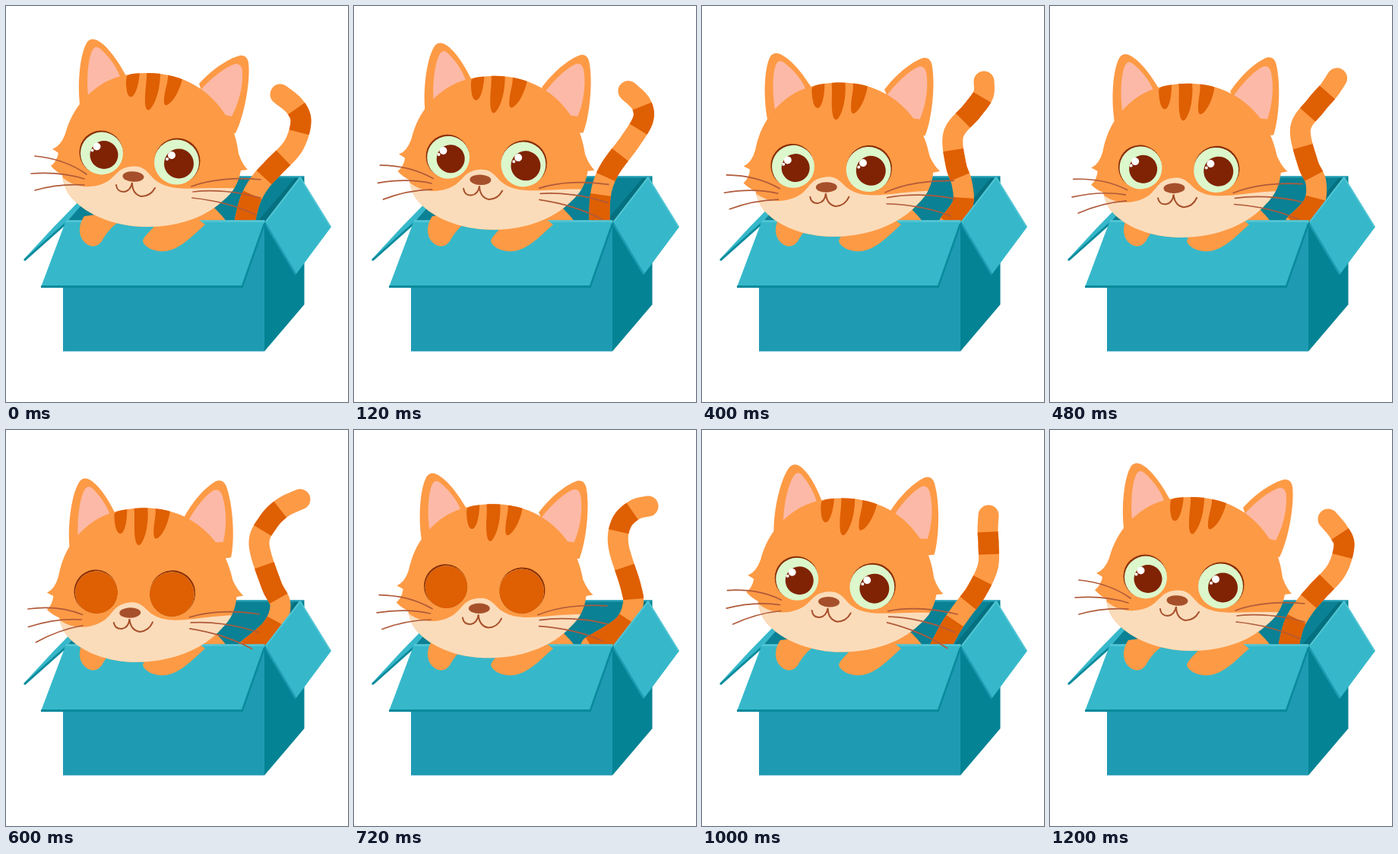
Recreate the animation shown at these times as an HTML page with a canvas. Size 450 by 520 pixels, loop 1240 ms.

```html
<!DOCTYPE html>
<html lang="en">
<head>
<meta charset="utf-8">
<title>Kitten in a box</title>
<style>
html, body { margin: 0; width: 100%; height: 100%; overflow: hidden; background: #fff; }
canvas { display: block; width: 450px; height: 520px; }
</style>
</head>
<body>
<canvas id="stage" width="450" height="520"></canvas>
<script>
const ctx = document.getElementById('stage').getContext('2d');
const LOOP = 1240, STEP = 40;
const C = {
  fur: '#fd9a45', stripe: '#df5f03', cream: '#fbdcba', pink: '#fcb9a7',
  iris: '#dcf7cb', pupil: '#7f2304', rim: '#8a2f06', nose: '#a6502b', line: '#b05a3a',
  flap: '#36b8ca', front: '#1e9bb2', side: '#048394', inside: '#0a8194',
  deep: '#05707f', edge: '#0a8a9c', light: '#55c7d6'
};

const shape = Object.fromEntries(Object.entries({
  head: 'M78 168 C86 140 100 120 124 104 C142 92 164 88 185 88 C235 88 270 112 290 145 C300 162 304 178 306 194 Q311 208 318 215 L309 216 C306 232 300 244 285 256 C262 278 225 290 187 290 C140 290 100 272 82 246 C77 238 75 230 74 222 Q65 217 59 210 Q67 204 69 193 Q65 190 61 188 Q72 184 78 168Z',
  muzzle: 'M68 218 C82 238 112 243 134 230 C146 222 148 211 168 210.5 C184 210 188 222 197 229 C220 247 255 236 312 240 L312 300 L68 300Z',
  stripes: 'M159 92 Q167 87 176 86 C175 102 171 116 166 119 Q161 121 159 112 Q157 100 159 92Z M185 86 L203 88 C203 110 196 130 189 136 Q184 139 183 128 C182 112 186 98 185 86Z M213 88 Q224 91 232 96 C228 112 220 126 212 130 Q207 132 208 122 C209 108 214 100 213 88Z',
  earL: 'M98 136 C93 105 97 62 107 47 Q112 41 120 45 C135 53 149 75 158 92 L150 130 L110 150Z',
  pinkL: 'M109 125 C105 98 108 65 115 56 Q119 51 126 58 C138 69 147 82 152 98 L130 125Z',
  earR: 'M254 102 C270 84 292 69 308 65 Q317 64 319 74 C322 100 313 145 302 167 L275 165Z',
  pinkR: 'M257 109 C270 95 288 80 302 76 Q310 75 311 86 C312 108 305 130 297 145 L275 140Z',
  mouth: 'M145 235 Q146 244 155 244 Q164 243 166 232 Q166 247 178 250 Q190 250 196 239',
  hairL: 'M106 221 Q78 201 38 197 M103 227 Q72 217 33 220 M103 235 Q70 233 38 242',
  hairR: 'M244 237 C270 227 305 225 335 228 M246 244 C270 241 305 243 335 252 M245 252 C275 255 303 262 328 274',
  pawL: 'M103 276 C96 286 95 298 100 306 C107 317 119 319 126 309 C131 300 138 290 148 284 L148 270Z',
  pawR: 'M196 288 C190 296 181 302 180 309 C183 318 197 323 209 322 C228 320 242 305 262 287 L240 270Z',
  body: 'M150 284 L150 250 L255 250 Q278 266 291 284Z'
}).map(([name, d]) => [name, new Path2D(d)]));

// Tail spine from tip to base at each time.
const tailKeys = [
  [0, 361,116, 380,132, 388,152, 378,184, 352,212, 334,232, 321,256, 313,288],
  [240, 363,107, 375,125, 371,146, 347,173, 329,208, 326,232, 328,256, 331,288],
  [400, 371,99, 370,117, 355,138, 331,168, 334,208, 342,233, 343,260, 325,286],
  [600, 387,91, 364,102, 345,121, 333,150, 349,203, 361,230, 350,260, 318,288],
  [720, 387,100, 369,105, 352,122, 348,152, 364,205, 367,230, 354,257, 312,284],
  [1000, 377,112, 376,131, 377,151, 376,180, 361,212, 344,235, 328,258, 312,288],
  [1200, 366,117, 380,134, 387,152, 377,184, 352,212, 335,232, 321,256, 313,288]
];
const bands = [[1.15, 2.45], [3.52, 4.65], [5.7, 7]];

// Ear and whisker twitch in degrees.
const twitchKeys = [[0, 0], [200, 6], [400, 0.5], [600, 8.3], [720, 1.5], [800, 0], [1000, 8.8], [1200, 0]];
const lidKeys = [[0, 0], [480, 0], [560, 1], [760, 1], [840, 0], [1240, 0]];

// Periodic smooth interpolation through a table of keys.
function smooth(keys, t) {
  const n = keys.length;
  const at = i => {
    const turn = Math.floor(i / n), k = keys[i - turn * n];
    return { t: k[0] + turn * LOOP, v: k.slice(1) };
  };
  let i = n - 1;
  while (keys[i][0] > t) i--;
  const [a, b, c, d] = [at(i - 1), at(i), at(i + 1), at(i + 2)];
  const h = c.t - b.t, s = (t - b.t) / h;
  return b.v.map((v, j) => {
    const m0 = (c.v[j] - a.v[j]) / (c.t - a.t) * h;
    const m1 = (d.v[j] - v) / (d.t - b.t) * h;
    const e = c.v[j] - v;
    return v + s * (m0 + s * (3 * e - 2 * m0 - m1 + s * (m0 + m1 - 2 * e)));
  });
}

function ramp(keys, t, ease = x => x) {
  let i = keys.length - 1;
  while (keys[i][0] > t) i--;
  const a = keys[i], b = keys[i + 1] || [LOOP, keys[0][1]];
  return a[1] + (b[1] - a[1]) * ease((t - a[0]) / (b[0] - a[0]));
}
const wave = x => (1 - Math.cos(Math.PI * x)) / 2;

function fill(path, color) {
  ctx.fillStyle = color;
  ctx.fill(path);
}
function stroke(path, color, width) {
  ctx.strokeStyle = color;
  ctx.lineWidth = width;
  ctx.stroke(path);
}
function poly(color, ...pts) {
  ctx.beginPath();
  for (let i = 0; i < pts.length; i += 2) ctx.lineTo(pts[i], pts[i + 1]);
  ctx.closePath();
  ctx.fillStyle = color;
  ctx.fill();
}
function oval(color, x, y, rx, ry = rx, turn = 0) {
  ctx.beginPath();
  ctx.ellipse(x, y, rx, ry, turn, 0, 7);
  ctx.fillStyle = color;
  ctx.fill();
}
function line(color, width, x1, y1, x2, y2) {
  ctx.beginPath();
  ctx.moveTo(x1, y1);
  ctx.lineTo(x2, y2);
  ctx.strokeStyle = color;
  ctx.lineWidth = width;
  ctx.stroke();
}
function turned(x, y, deg, draw) {
  ctx.save();
  ctx.translate(x, y);
  ctx.rotate(deg * Math.PI / 180);
  ctx.translate(-x, -y);
  draw();
  ctx.restore();
}

function boxBack() {
  poly(C.flap, 23, 333, 62, 291, 112, 240, 112, 250, 80, 282, 76, 289);
  line(C.edge, 3, 24, 334, 78, 286);
  poly(C.inside, 80, 283, 132, 224, 392, 224, 341, 283);
  poly(C.deep, 380, 226, 389, 224, 341, 283, 331, 283);
  line(C.flap, 2, 78, 284, 130, 225);
  line(C.front, 2.5, 130, 224.5, 392, 224.5);
}

function boxFront() {
  poly(C.front, 75, 300, 340, 283, 340, 453.5, 75, 453.5);
  poly(C.side, 340, 284, 392.5, 223, 392.5, 392, 340, 453.5);
  poly(C.flap, 341, 284, 387, 224, 428, 290, 381, 353);
  line(C.front, 2.5, 342, 287, 381, 352);
  line(C.light, 2, 342, 283, 387, 225);
  line(C.light, 1.5, 387, 225, 427, 290);
  poly(C.flap, 79, 281.5, 341, 281.5, 311, 369, 46, 369);
  line(C.light, 2.5, 79, 282.5, 340, 282.5);
  line(C.edge, 3, 46, 368.5, 312, 368.5);
  line(C.edge, 2.5, 311, 368, 340, 286);
}

function tail(t) {
  const p = smooth(tailKeys, t), last = p.length / 2 - 1;
  const point = u => {
    const i = Math.min(Math.floor(u), last - 1), s = u - i;
    return [0, 1].map(axis => {
      const q = k => p[2 * Math.max(0, Math.min(last, k)) + axis];
      const a = q(i - 1), b = q(i), c = q(i + 1), d = q(i + 2);
      return b + s / 2 * (c - a + s * (2 * a - 5 * b + 4 * c - d + s * (3 * (b - c) + d - a)));
    });
  };
  const part = (from, to, color, cap) => {
    const n = Math.ceil((to - from) * 12);
    ctx.beginPath();
    for (let k = 0; k <= n; k++) ctx.lineTo(...point(from + (to - from) * k / n));
    ctx.lineCap = cap;
    ctx.lineJoin = 'round';
    ctx.strokeStyle = color;
    ctx.lineWidth = 27;
    ctx.stroke();
  };
  ctx.save();
  ctx.beginPath();
  ctx.rect(0, 0, 450, 283);
  ctx.clip();
  part(0, last, C.fur, 'round');
  for (const [from, to] of bands) part(from, to, C.stripe, 'butt');
  ctx.restore();
}

function eye(x, y, r, side, lid) {
  oval(C.rim, x + side, y - 1.5, r, r);
  ctx.save();
  ctx.beginPath();
  ctx.arc(x, y, r - 0.5, 0, 7);
  ctx.clip();
  ctx.fillStyle = C.iris;
  ctx.fillRect(x - r, y - r, 2 * r, 2 * r);
  const px = x + 3, py = y + 2, pr = r * 0.65;
  oval(C.pupil, px, py, pr);
  oval('#fff', px - 9.5, py - 11, 5);
  oval('#fff', px - 15.5, py - 6, 2);
  if (lid > 0) {
    ctx.fillStyle = C.stripe;
    ctx.fillRect(x - r, y - r, 2 * r, 2 * r * lid);
  }
  ctx.restore();
}

function head(t) {
  const p = t < 600
    ? 1 - (1 - Math.max(0, t - 40) / 560) ** 2
    : Math.max(0, 1 - (t - 600) / 600) ** 2;
  const w = ramp(twitchKeys, t, wave), lid = ramp(lidKeys, t);
  ctx.save();
  ctx.translate(-6.5 * p, 14.5 * p);
  turned(185, 200, -5.2 * p, () => {
    turned(122, 120, w, () => {
      fill(shape.earL, C.fur);
      fill(shape.pinkL, C.pink);
    });
    turned(283, 138, -1.1 * w, () => {
      fill(shape.earR, C.fur);
      fill(shape.pinkR, C.pink);
    });
    fill(shape.head, C.fur);
    ctx.save();
    ctx.clip(shape.head);
    fill(shape.muzzle, C.cream);
    fill(shape.stripes, C.stripe);
    ctx.restore();
    eye(126, 193.5, 28.5, -1, lid);
    eye(224.5, 205, 30, 1, lid);
    ctx.lineCap = 'round';
    stroke(shape.mouth, C.nose, 2);
    oval(C.nose, 167.5, 224, 14, 6.8, 0.06);
    turned(104, 228, -w, () => stroke(shape.hairL, C.line, 1.7));
    turned(245, 244, w, () => stroke(shape.hairR, C.line, 1.7));
  });
  ctx.restore();
}

function draw(t) {
  ctx.fillStyle = '#fff';
  ctx.fillRect(0, 0, 450, 520);
  ctx.lineCap = 'butt';
  boxBack();
  tail(t);
  fill(shape.body, C.fur);
  ctx.lineCap = 'butt';
  boxFront();
  fill(shape.pawL, C.fur);
  fill(shape.pawR, C.fur);
  head(t);
}

const start = performance.now();
function tick() {
  let t = Math.floor((performance.now() - start) % LOOP / STEP) * STEP;
  if (t === 40 || t === 1040) t -= STEP; // two longer holds
  draw(t);
  requestAnimationFrame(tick);
}
tick();
</script>
</body>
</html>
```
